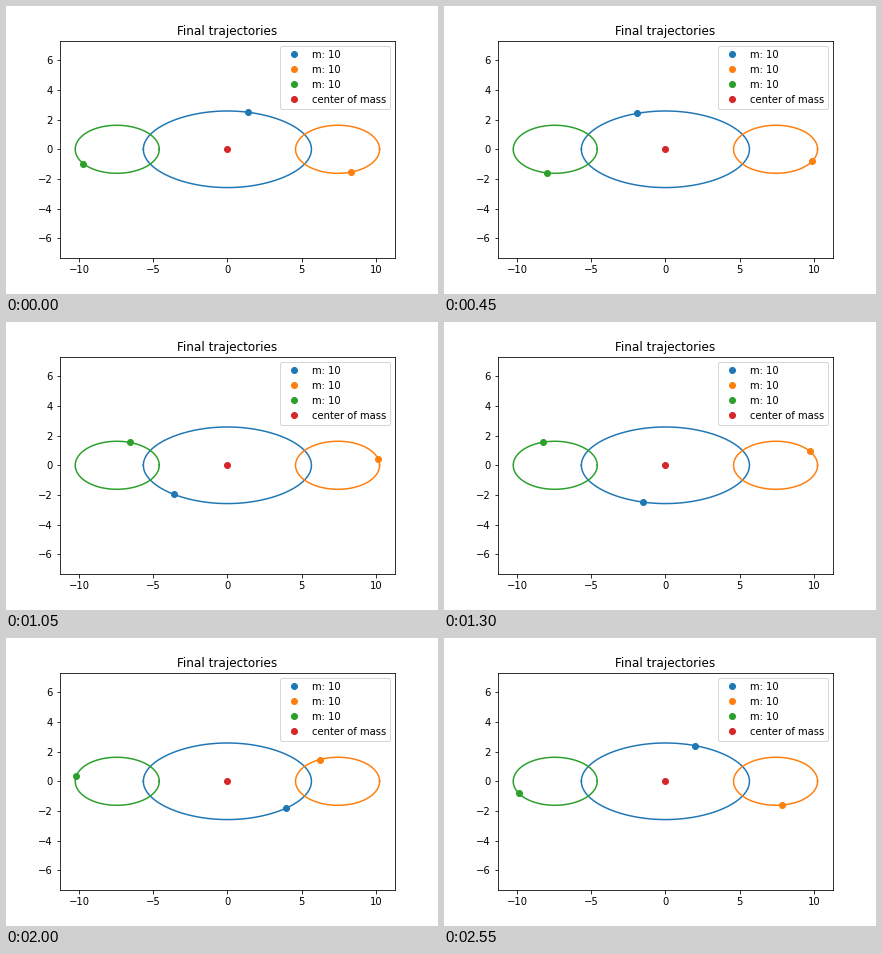
A matplotlib script that plays this animation: 432x288 px, repeating every 2.6 s.

```python
import numpy as np
import matplotlib.pyplot as plt
from matplotlib.animation import FuncAnimation

FRAMES = 52
INTERVAL = 50          # ms
PERIOD = 52.63         # orbital period, in frames
ALIGNED = 16.955       # moment the three bodies line up, in frames
SUBSTEPS = 100         # integration steps per frame

MASS = 10
SCALE = MASS ** (2 / 3)
T = 6.283213           # orbital period for unit masses

# Periodic three-body orbit, unit masses, starting on the x axis.
X0 = [-1.2203557197, 2.2096177241, -0.9892620043]
VY0 = [-2.1079512924, 0.1910268738, 1.9169244185]


def acceleration(pos):
    """Mutual gravity of unit masses at complex positions."""
    gap = pos[None, :] - pos[:, None]
    dist = np.abs(gap) + np.eye(len(pos))
    return (gap / dist ** 3).sum(axis=1)


def derivative(state):
    return np.array([state[1], acceleration(state[0])])


def integrate(steps):
    """Positions over one period by fourth-order Runge-Kutta."""
    h = T / steps
    state = np.array([X0, 1j * np.array(VY0)], dtype=complex)
    path = np.empty((steps + 1, 3), dtype=complex)
    for i in range(steps + 1):
        path[i] = state[0]
        k1 = derivative(state)
        k2 = derivative(state + h / 2 * k1)
        k3 = derivative(state + h / 2 * k2)
        k4 = derivative(state + h * k3)
        state = state + h / 6 * (k1 + 2 * k2 + 2 * k3 + k4)
    return path * SCALE


steps = round(PERIOD * SUBSTEPS)
orbit = integrate(steps)

fig = plt.figure(figsize=(6, 4), dpi=72, facecolor="white")
fig.subplots_adjust(left=0.125, right=0.9, bottom=0.125, top=0.88)
ax = fig.add_subplot()

dots = []
for body, color in enumerate(["C0", "C1", "C2"]):
    path = orbit[:, body]
    ax.plot(path.real, path.imag, color=color, lw=1.5)
    dots += ax.plot([], [], "o", color=color, ms=6, label=f"m: {MASS}")
ax.plot([0], [0], "o", color="C3", ms=6, label="center of mass")

box = ax.get_position()
half = 1.1 * np.abs(orbit.real).max()
ratio = (box.height * 4) / (box.width * 6)
ax.set_xlim(-half, half)
ax.set_ylim(-half * ratio, half * ratio)
ax.set_xticks(range(-10, 11, 5))
ax.set_yticks(range(-6, 7, 2))
ax.set_title("Final trajectories")
ax.legend(loc="upper right")


def update(frame):
    index = round((frame - ALIGNED) * SUBSTEPS) % steps
    for dot, pos in zip(dots, orbit[index]):
        dot.set_data([pos.real], [pos.imag])
    return dots


anim = FuncAnimation(fig, update, frames=FRAMES, interval=INTERVAL,
                     repeat=True, repeat_delay=0)
plt.show()
```
